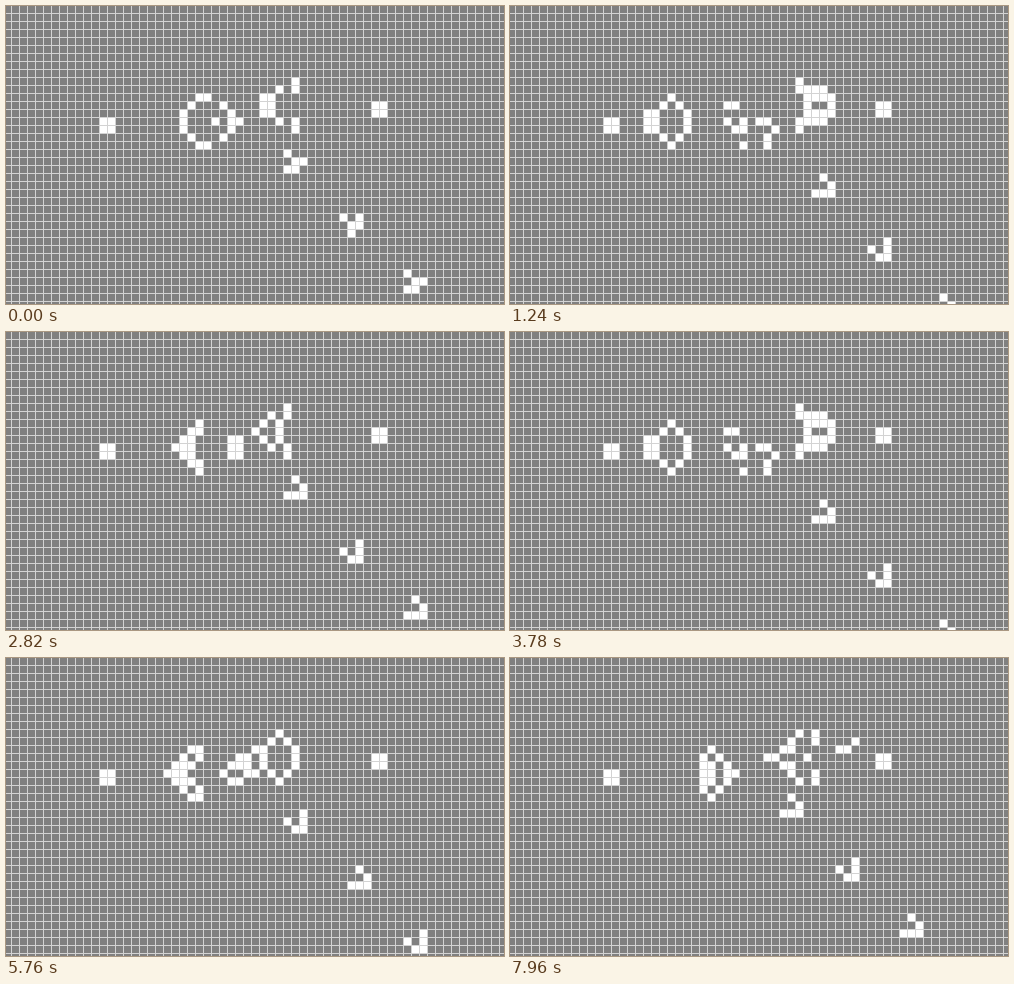
These frames come from a looping animation (498x298 px, 8000 ms). A matplotlib script:

```python
import numpy as np
import matplotlib.pyplot as plt
from matplotlib.animation import FuncAnimation

W, H, DPI = 498, 298, 100
LOOP, TICK = 8000, 20
CELL, PAD = 8, 2          # cell pitch in pixels, hidden cells left of and above the stage
SHIFT_X = 6               # first full column starts here
GREY, WHITE, LINE = 128, 255, 211

GUN = """
........................X
......................X.X
............XX......XX...
...........X...X....XX...
..........X.....X...XX...
..........X...X.XX....X.X
..........X.....X.......X
...........X...X.........
............XX...........
"""
BLOCK = "XX\nXX"
GLIDER_B = "X.X\n.XX\n.X."
GLIDER_D = "X..\n.XX\nXX."

# The refresh is uneven: moments (ms) and the generation reached at each.
MOMENTS = [120, 580, 1000, 1240, 2120, 2380, 3780, 4040, 4880, 6720, 6980, 7960]
REACHED = [1, 8, 10, 13, 25, 27, 43, 45, 55, 75, 77, 87]
PAIRED_FROM = 13          # from here on every second generation is shown


def place(world, text, col, row):
    for y, line in enumerate(text.split()):
        for x, c in enumerate(line):
            if c == "X":
                world[row + y + PAD, col + x + PAD] = 1


def step(world):
    n = sum(np.roll(world, (dy, dx), (0, 1))
            for dy in (-1, 0, 1) for dx in (-1, 0, 1)) - world
    return ((n == 3) | ((n == 2) & (world == 1))).astype(int)


def picture(world):
    big = np.kron(np.where(world, WHITE, GREY), np.ones((CELL, CELL), int))
    big[CELL - 1::CELL] = LINE
    big[:, CELL - 1::CELL] = LINE
    x, y = PAD * CELL - SHIFT_X, PAD * CELL
    return big[y:y + H, x:x + W].astype(np.uint8)


def generation(ms):
    g = int(np.interp(ms, MOMENTS, REACHED, left=0) + 1e-6)
    return g - max(g - PAIRED_FROM, 0) % 2


world = np.zeros((70, 90), int)
place(world, GUN, 11, 9)
place(world, BLOCK, 11, 14)
place(world, BLOCK, 45, 12)
place(world, GLIDER_D, 34, 18)
place(world, GLIDER_B, 41, 26)
place(world, GLIDER_D, 49, 33)

pictures = []
for _ in range(REACHED[-1] + 1):
    pictures.append(picture(world))
    world = step(world)

fig = plt.figure(figsize=(W / DPI, H / DPI), dpi=DPI)
ax = fig.add_axes([0, 0, 1, 1])
ax.axis("off")
image = ax.imshow(pictures[0], cmap="gray", vmin=0, vmax=255,
                  interpolation="nearest", aspect="auto")


def update(i):
    image.set_data(pictures[generation(i * TICK)])
    return [image]


anim = FuncAnimation(fig, update, frames=LOOP // TICK, interval=TICK,
                     repeat=True, repeat_delay=0)
plt.show()
```
